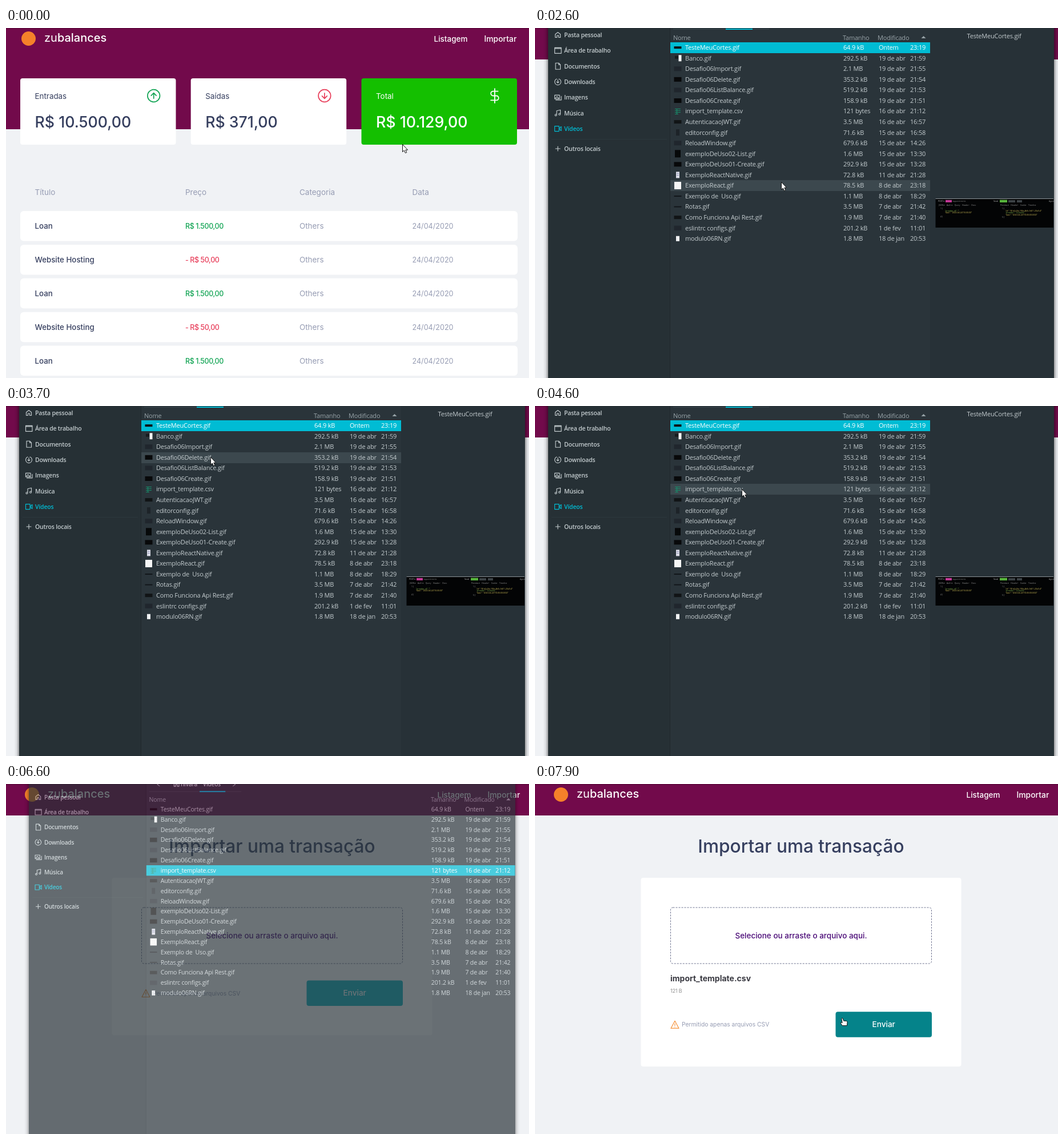
Recreate the animation shown at these times as an HTML page. Size 916 by 612 pixels, loop 8 s.

```html
<!DOCTYPE html>
<html lang="pt-BR">
<head>
<meta charset="utf-8">
<title>Importar uma transação</title>
<style>
html, body { margin: 0; width: 100%; height: 100%; overflow: hidden; background: #f0f2f5; }
svg { display: block; width: 100vw; height: 100vh; }
text { white-space: pre; }
.page text { font-family: Inter, "Open Sans", sans-serif; }
.dialog text { font-family: "Open Sans", "Noto Sans", sans-serif; font-size: 11px; letter-spacing: -.2px; fill: #c3cbce; }
.dialog .side { font-size: 10.5px; font-weight: 600; }
.dialog .head { fill: #98a3a8; }
.dialog .here { fill: #00bcd4; }
.dialog .picked text { fill: #fff; }
.dialog .tiny { font-size: 3.4px; letter-spacing: 0; }
.line { fill: none; stroke-linecap: round; stroke-linejoin: round; }
</style>
</head>
<body>
<svg id="stage" viewBox="0 0 916 612" preserveAspectRatio="none"></svg>
<script>
const LOOP = 8000, STEP = 100;
const INK = '#363f5f', GREY = '#969cb3', GREEN = '#12a454', RED = '#e83f5b';
const ROW_TOP = 24.9, ROW_H = 18.56, PICK = 6;

const rect = (x, y, w, h, fill, more = '') =>
  `<rect x="${x}" y="${y}" width="${w}" height="${h}" fill="${fill}" ${more}/>`;
const text = (x, y, str, size, fill, weight = 400, more = '') =>
  `<text x="${x}" y="${y}" font-size="${size}" fill="${fill}" font-weight="${weight}" ${more}>${str}</text>`;
const label = (x, y, str, cls = '', more = '') => `<text x="${x}" y="${y}" class="${cls}" ${more}>${str}</text>`;
const line = (d, color, width, more = '') =>
  `<path class="line" d="${d}" stroke="${color}" stroke-width="${width}" ${more}/>`;
const MID = 'text-anchor="middle"';

// Web pages
function header(dx, height) {
  return rect(0, 0, 916, height, '#720a4b') + rect(0, 0, 916, 2, '#000', 'opacity=".14"') +
    `<g transform="translate(${dx})"><circle cx="39.5" cy="18.5" r="12.5" fill="#f5812a"/>` +
    text(67, 24, 'zu<tspan font-weight="500">balances</tspan>', 20, '#fff') +
    text(749.5, 23.5, 'Listagem', 13.5, '#fff', 500) +
    text(837.5, 23.5, 'Importar', 13.9, '#fff', 500, 'class="link"') + '</g>';
}

function card(x, title, sum, fill, ink, icon) {
  return rect(x, 88, 272.5, 116, fill, 'rx="4"') +
    text(x + 25.5, 123.5, title, 13.4, ink) + text(x + 25.5, 174, sum, 26.7, ink, 500) + icon;
}

function arrowIcon(x, color, dir) {
  return `<g transform="translate(${x} 118.5) scale(1 ${dir})">` +
    `<circle r="10.8" fill="none" stroke="${color}" stroke-width="1.7"/>` +
    line('M0 4.6V-4.6M-4.4 -.4 0 -4.8 4.4 -.4', color, 1.7) + '</g>';
}

function listPage() {
  const dollar = '<g transform="translate(856 118.5) scale(1.13) translate(-12 -12)">' +
    line('M12 1v22M17 5H9.5a3.5 3.5 0 0 0 0 7h5a3.5 3.5 0 0 1 0 7H6', '#fff', 1.6) + '</g>';
  let out = header(0, 177) +
    card(25, 'Entradas', 'R$ 10.500,00', '#fff', INK, arrowIcon(258.7, GREEN, 1)) +
    card(323.7, 'Saídas', 'R$ 371,00', '#fff', INK, arrowIcon(557.9, RED, -1)) +
    card(622.5, 'Total', 'R$ 10.129,00', '#14bf00', '#fff', dollar);
  const cols = [50.5, 314, 514, 711.5];
  ['Título', 'Preço', 'Categoria', 'Data'].forEach((s, i) => out += text(cols[i], 292, s, 13.5, GREY));
  for (let i = 0; i < 5; i++) {
    const y = 320 + i * 58.9, loan = i % 2 === 0;
    out += rect(25, y, 871, 52.5, '#fff', 'rx="6"') +
      text(cols[0], y + 31, loan ? 'Loan' : 'Website Hosting', 13.3, INK, 500) +
      text(cols[1], y + 31, loan ? 'R$ 1.500,00' : '- R$ 50,00', 12.5, loan ? GREEN : RED, 500, 'letter-spacing="-.4"') +
      text(cols[2], y + 31, 'Others', 13.4, GREY) + text(cols[3], y + 31, '24/04/2020', 12.6, GREY);
  }
  return out;
}

function importPage() {
  return header(6, 55) +
    text(466, 120, 'Importar uma transação', 31.6, INK, 500, MID) +
    rect(185.5, 164, 561, 275.5, '#fff', 'rx="4" id="panel"') +
    rect(237.5, 216, 457, 98, 'none', 'rx="4" stroke="#6f7490" stroke-dasharray="3 2"') +
    text(466, 269.5, 'Selecione ou arraste o arquivo aqui.', 13.5, '#4a0a77', 500, MID) +
    '<g id="file">' + text(237, 345, 'import_template.csv', 14, '#3a3a42', 700) +
    text(237, 365, '121 B', 9.3, '#969696', 400, 'letter-spacing="-.35"') + '</g>' +
    '<g id="foot">' +
    line('M245 359.5 252 372.5H238zM245 364.5v3.2M245 370v.1', '#f59138', 1.2) +
    text(257, 369.5, 'Permitido apenas arquivos CSV', 10.3, GREY) +
    rect(526.5, 343.5, 168.5, 44.5, '#08b3c1', 'rx="4" id="send"') +
    text(610.7, 370, 'Enviar', 13.6, '#fff', 500, MID) + '</g>';
}

// File dialog
const files = `TesteMeuCortes.gif|64.9 kB|Ontem|23:19|strip
Banco.gif|292.5 kB|19 de abr|21:59|page
Desafio06Import.gif|2.1 MB|19 de abr|21:55|dim
Desafio06Delete.gif|353.2 kB|19 de abr|21:54|black
Desafio06ListBalance.gif|519.2 kB|19 de abr|21:53|dim
Desafio06Create.gif|158.9 kB|19 de abr|21:51|black
import_template.csv|121 bytes|16 de abr|21:12|sheet
AutenticacaoJWT.gif|3.5 MB|16 de abr|16:57|short
editorconfig.gif|71.6 kB|15 de abr|16:58|slim
ReloadWindow.gif|679.6 kB|15 de abr|14:26|dim
exemploDeUso02-List.gif|1.6 MB|15 de abr|13:30|tall
ExemploDeUso01-Create.gif|292.9 kB|15 de abr|13:28|black
ExemploReactNative.gif|72.8 kB|11 de abr|21:28|phone
ExemploReact.gif|78.5 kB|8 de abr|23:18|white
Exemplo de  Uso.gif|1.1 MB|8 de abr|18:29|thin
Rotas.gif|3.5 MB|7 de abr|21:42|thin
Como Funciona Api Rest.gif|1.9 MB|7 de abr|21:40|short
eslintrc configs.gif|201.2 kB|1 de fev|11:01|dim
modulo06RN.gif|1.8 MB|18 de jan|20:53|small`.split('\n').map(s => s.split('|'));

const thumbs = {
  strip: [13, 4, '#0c0f11'], page: [5, 11, '#f4f4f4'], dim: [13, 8, '#20262d'], black: [13, 8, '#08090a'],
  short: [13, 6, '#111416'], slim: [6, 11, '#1d2328'], tall: [10, 13, '#07090a'],
  phone: [6, 11, '#dcdde8'], small: [6, 9, '#f0f2f4'], white: [12, 13, '#f6f6f6'], thin: [13, 2, '#12161a']
};

function thumb(kind, y) {
  if (kind === 'sheet') return line(`M245.5 ${y - 4}h9M245.5 ${y - 1}h9M245.5 ${y + 2}h9M245.5 ${y + 5}h5M248.5 ${y - 4}v9`, '#178f6c', 1);
  const [w, h, fill] = thumbs[kind], x = kind === 'page' ? 251.5 : 250 - w / 2;
  let out = rect(x, y - h / 2, w, h, fill);
  if (kind === 'page') out += rect(245, y - 4, 6, 5, '#161a1d');
  if (kind === 'phone') out += rect(248, y - 3, 4, 1, '#8d8fb5') + rect(248, y, 4, 1, '#8d8fb5');
  return out;
}

const places = [
  ['Pasta pessoal', 'M3 10 12 3l9 7v11h-6v-7H9v7H3z'],
  ['Área de trabalho', 'M1 2h23v20H1zM1 5h23'],
  ['Documentos', 'M4 1h11l6 6v16H4zM15 1v6h6'],
  ['Downloads', 'M12 5v11M8 12l4 4 4-4M8 2a11 11 0 1 0 8 0'],
  ['Imagens', 'M1 4h17v13H1zM5 21h19V8M4 14l5-5 6 6'],
  ['Música', 'M8 19V4l13-3v15M8 19a3 3 0 1 1-6 0a3 3 0 1 1 6 0M21 16a3 3 0 1 1-6 0a3 3 0 1 1 6 0'],
  ['Vídeos', 'M1 3h15v18H1zM19 8l5-3v14l-5-3z']
];

function place(y, name, d, here) {
  return line(d, here ? '#00bcd4' : '#c3cbce', 2.3, `transform="translate(34 ${y - 6}) scale(.5)"`) +
    label(51, y + 4, name, here ? 'side here' : 'side');
}

function preview() {
  const code = (x, y, s, fill) => label(x, y, s, 'tiny', `style="fill:${fill}"`);
  return label(804, 18, 'TesteMeuCortes.gif', '', MID) + rect(701.5, 298, 206.5, 51, '#030405') +
    rect(701.5, 298, 206.5, 1, '#8a9094') + rect(719, 300.8, 11, 4, '#c93a9b') + rect(814, 300.5, 13, 4.5, '#57b33c') +
    rect(829, 301, 12, 4, '#3c4246') + rect(844, 301, 9, 4, '#3c4246') +
    code(706, 304, 'POST ▾', '#ccc') + code(731, 304, '/appointments', '#888') +
    code(803, 304, 'Send', '#ccc') + code(900, 304, 'Agora', '#999') +
    code(707, 311, 'JSON ▾    Auth ▾    Query    Header¹    Docs', '#999') +
    code(815, 311, 'Preview ▾    Header⁶    Cookie    Timeline', '#999') +
    code(710, 317, '1 {', '#aaa') + code(718, 320.5, '"provider_id": "",', '#8cc152') +
    code(718, 324, '"date": "2020-04-24T10:00:00"', '#d3c05a') + code(710, 331, '4 }', '#aaa') +
    code(818, 317, '1 {', '#aaa') + code(824, 320.5, '"id": "81e0c24a-1f5b-4b0c-9d11-20a7c4"', '#d3c05a') +
    code(824, 324, '"provider": "consulta",', '#8cc152') + code(824, 327.5, '"date": "2020-04-24T10:00:00.000Z"', '#d3c05a') +
    code(818, 332, '5 }', '#aaa');
}

function dialog() {
  let out = rect(14, -60, 9, 760, 'url(#shadeL)') + rect(909, -60, 9, 760, 'url(#shadeR)') +
    rect(23, -60, 886, 760, '#263035') + rect(236, -60, 673, 760, '#2a343a') + rect(236, -60, 1, 760, '#20292d') +
    rect(242, 1.5, 168, 1, '#3b474d') + rect(334, 1, 47, 2, '#00bcd4') +
    line('M261 -14l-4 3 4 3M395 -14l4 3-4 3', '#98a3a8', 1.2) +
    line(places[0][1], '#c3cbce', 2.3, 'transform="translate(286 -18) scale(.5)"') +
    label(299.5, -7.5, 'nivara', 'side') + label(340, -7.5, 'Vídeos', 'side');
  places.forEach(([name, d], i) => out += place(12 + i * 27.35, name, d, i === 6));
  out += rect(29, 194, 202, 1, '#2c373c') + place(211, 'Outros locais', 'M12 4v16M4 12h16') +
    rect(237, 25, 455, 19, '#3c484e', 'id="hover"') + rect(237, 25, 455, 19, '#00bcd4', 'id="pick"') +
    label(242, 20.5, 'Nome', 'head') + '<g class="cols">' + label(539, 20.5, 'Tamanho', 'head') +
    label(600, 20.5, 'Modificado', 'head') + '<path d="M676.5 18h8l-4-4z" fill="#98a3a8"/></g>';
  files.forEach(([name, size, date, time, kind], i) => {
    const mid = ROW_TOP + ROW_H * (i + .5), y = mid + 3.9;
    out += `<g class="row">${thumb(kind, mid)}${label(263, y, name)}<g class="cols">` +
      label(540, y, size) + label(602, y, date) + label(657, y, time) + '</g></g>';
  });
  return out + `<g id="preview">${rect(692, -60, 217, 760, '#273137')}${preview()}</g>`;
}

const shade = (id, a, b) => `<linearGradient id="${id}"><stop offset="0" stop-opacity="${a}"/>` +
  `<stop offset=".5" stop-opacity=".08"/><stop offset="1" stop-opacity="${b}"/></linearGradient>`;
document.getElementById('stage').innerHTML =
  '<defs>' + shade('shadeL', 0, .35) + shade('shadeR', .35, 0) +
  '<linearGradient id="dim" x2="0" y2="1"><stop offset="0" stop-opacity=".22"/><stop offset="1" stop-opacity="0"/></linearGradient></defs>' +
  rect(0, 0, 916, 612, '#f0f2f5') +
  `<g class="page" id="list">${listPage()}</g><g class="page" id="import">${importPage()}</g>` +
  rect(0, 0, 916, 45, 'url(#dim)', 'id="veil"') +
  `<g class="dialog" id="dialog">${dialog()}</g>` +
  '<g id="cursor" fill="#fff" stroke="#111" stroke-linejoin="round">' +
  '<path id="arrow" d="M.5 .5V13.6L3.4 11 5.4 15.6 7.8 14.6 5.8 10.2H9.6Z"/>' +
  '<path id="hand" d="M-3.2 1.2Q-2 -.6 -.8 1L.6 5.2 5.4 5.4Q7.2 5.8 7 8L6.4 13.5H-1.6L-4.6 9.4Q-5 7.4 -3 8L-1.8 8.6Z"/></g>';

// Motion
const $ = id => document.getElementById(id);
const all = css => [...document.querySelectorAll(css)];
const rows = all('.row'), cols = all('.cols'), links = all('.link');
const show = (id, on) => $(id).setAttribute('display', on ? 'inline' : 'none');
const set = (id, attrs) => { for (const k in attrs) $(id).setAttribute(k, attrs[k]); };
const clamp = v => Math.max(0, Math.min(1, v));
const smooth = p => p * p * (3 - 2 * p), easeIn = p => p * p, easeOut = p => 1 - (1 - p) * (1 - p);
const within = (p, x0, y0, x1, y1) => p.x > x0 && p.x < x1 && p.y > y0 && p.y < y1;
const rowY = i => Math.round(ROW_TOP + ROW_H * i);

// start, end, x, y, easing
const moves = [
  [0, 800, 834, 18, smooth], [900, 1000, 846, 19, smooth], [1000, 1500, 852, 20, smooth],
  [1700, 1800, 702, 115, smooth], [1800, 2200, 431, 269, easeOut], [2800, 3700, 358, 89, smooth],
  [3700, 3800, 359, 83, smooth], [3900, 4600, 362, 145, smooth], [4900, 5500, 700, 717, easeIn],
  [5500, 7300, 923, 681, smooth], [7300, 7900, 540, 409, easeOut]
];

function pointer(t) {
  let x = 694, y = 203;
  for (const [a, b, tx, ty, ease] of moves) {
    if (t <= a) break;
    const p = ease(clamp((t - a) / (b - a)));
    x += (tx - x) * p;
    y += (ty - y) * p;
  }
  return { x, y };
}

function draw(t) {
  const p = pointer(t), listing = t < 1200, loaded = t >= 6700;
  const open = t >= 2600 && t < 6800, picked = t >= 4800;

  show('list', listing);
  show('import', !listing);
  const fade = t < 1000 || t >= 1900 ? 0 : clamp((t - 950) / 200);
  links.forEach(el => el.setAttribute('opacity', 1 - .39 * fade));

  show('file', loaded);
  set('panel', { height: loaded ? 330 : 275.5 });
  set('foot', { transform: `translate(0 ${loaded ? 54.7 : 0})` });
  const h = clamp((t - 7650) / 200), from = [8, 179, 193], to = [5, 131, 138];
  set('send', { fill: `rgb(${from.map((v, i) => Math.round(v + (to[i] - v) * h))})` });
  show('veil', t >= 2400 && t < 2600);

  show('dialog', open);
  const closing = t >= 6600 ? (t >= 6700 ? 2 : 1) : 0;
  const scale = [1, .9616, .925][closing];
  set('dialog', {
    opacity: [1, .69, .25][closing],
    transform: `translate(466 294) scale(${scale}) translate(-466 -294)`
  });
  show('preview', !picked);
  cols.forEach(el => el.setAttribute('transform', `translate(${picked ? 216 : 0})`));

  const width = picked ? 671.5 : 455, chosen = picked ? PICK : 0;
  const over = Math.floor((p.y - ROW_TOP) / ROW_H);
  show('hover', over >= 0 && over < files.length && over !== chosen);
  set('hover', { y: rowY(over), width });
  set('pick', { y: rowY(chosen), width, fill: over === chosen ? '#1cc3d9' : '#00bcd4' });
  rows.forEach((el, i) => el.classList.toggle('picked', i === chosen));

  const onLink = t >= 1000 && within(p, 838, 8, 904, 32);
  const onDrop = !listing && !open && within(p, 237, 216, 695, 314);
  const onSend = loaded && within(p, 526, 398, 695, 443);
  const hand = onLink || onDrop || onSend;
  show('hand', hand);
  show('arrow', !hand);
  set('cursor', { transform: `translate(${Math.round(p.x)} ${Math.round(p.y)})` });
}

function tick() {
  const t = performance.now() % LOOP;
  draw(Math.floor(t / STEP) * STEP);
  requestAnimationFrame(tick);
}
tick();
</script>
</body>
</html>
```
